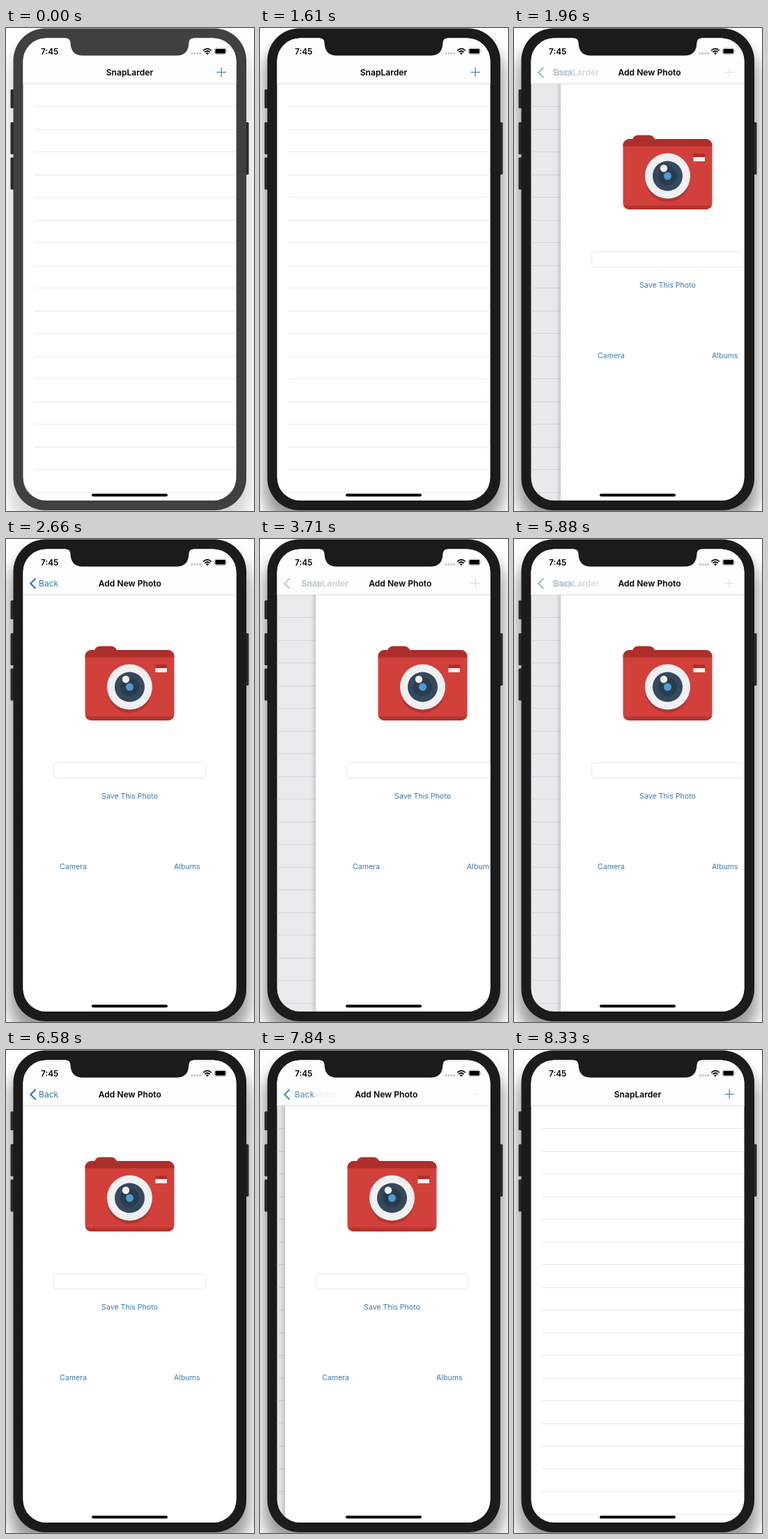
An HTML page for the animation above (9030 ms loop, 356x692 px).

```html
<!DOCTYPE html>
<html lang="en">
<head>
<meta charset="utf-8">
<title>Photo list</title>
<style>
  html, body { margin: 0; width: 100%; height: 100%; overflow: hidden; background: #fff; }
  svg { display: block; width: 356px; height: 692px; }
  text { font-family: Inter, Roboto, sans-serif; }
  .bar { font-size: 12.1px; }
  .bold { font-weight: 600; }
  .mid { text-anchor: middle; }
  .link { font-size: 10.6px; fill: #3878ae; }
  #shade { filter: blur(11px); }
</style>
</head>
<body>
<svg viewBox="0 0 356 692">
  <defs>
    <clipPath id="screen"><rect x="24.5" y="14.5" width="306" height="662.500" rx="33"/></clipPath>
    <clipPath id="cam"><rect x="113.500" y="159" width="128" height="101" rx="9"/></clipPath>
    <linearGradient id="edge"><stop offset="0" stop-opacity="0"/><stop offset="1" stop-opacity=".14"/></linearGradient>
  </defs>

  <rect id="shade" x="5" y="22" width="345" height="690" rx="46"/>
  <g fill="#292929">
    <rect x="6.5" y="88" width="8" height="27" rx="1.5"/>
    <rect x="6.5" y="135" width="8" height="46" rx="1.5"/>
    <rect x="6.5" y="185.5" width="8" height="46" rx="1.5"/>
    <rect x="340" y="135" width="8.5" height="75" rx="1.5"/>
  </g>
  <rect class="body" x="10.5" y=".5" width="334.5" height="690.5" rx="46"/>

  <g clip-path="url(#screen)">
    <rect x="24" y="14" width="307" height="664" fill="#fff"/>
    <g id="list" stroke="#e7e7e9"></g>
    <rect id="dim" x="24" y="80" width="307" height="600" fill="#06061a"/>
    <g id="page">
      <rect x="17" y="80" width="7" height="600" fill="url(#edge)"/>
      <rect x="24" y="80" width="308" height="600" fill="#fff"/>
      <path d="M126 164 Q127 153.500 135 153.500 H151 Q159 153.500 160.500 164 Z" fill="#ad2f2b"/>
      <g clip-path="url(#cam)">
        <rect x="113" y="159" width="129" height="101" fill="#d2403b"/>
        <rect x="113" y="159" width="129" height="10.500" fill="#ad2f2b"/>
        <rect x="113" y="254.500" width="129" height="6" fill="#b2342f"/>
      </g>
      <circle cx="177.500" cy="217" r="32" fill="#b2342f"/>
      <circle cx="177.500" cy="212" r="32.500" fill="#f0f0f2"/>
      <circle cx="177.500" cy="212" r="21.500" fill="#35495d"/>
      <circle cx="177.500" cy="212" r="13.500" fill="#2b3c4e"/>
      <circle cx="177.500" cy="212" r="5.500" fill="#4b9cd3"/>
      <circle cx="172" cy="201" r="5.200" fill="#f0f0f2"/>
      <rect x="214.500" y="180" width="16.500" height="5" fill="#ad2f2b"/>
      <rect x="214.500" y="185" width="16.500" height="6" fill="#f4f0f0"/>
      <rect x="68.500" y="320.500" width="218" height="22" rx="4" fill="#fff" stroke="#e6e6e7"/>
      <text class="link mid" x="177.500" y="372.200">Save This Photo</text>
      <text class="link mid" x="96.500" y="472.700">Camera</text>
      <text class="link mid" x="259.800" y="472.700">Albums</text>
    </g>

    <rect x="24" y="14" width="307" height="66" fill="#fdfdfd"/>
    <path d="M24 80H331" stroke="#d6d6d8"/>
    <path id="chevron" d="M42.500 56.500L35.200 63.800L42.500 71.100" fill="none" stroke="#3478b4" stroke-width="2.100"/>
    <text id="back" class="bar" x="47" y="68" fill="#3878ae">Back</text>
    <text id="listTitle" class="bar bold mid" x="177.500" y="68">SnapLarder</text>
    <text id="pageTitle" class="bar bold mid" x="177.800" y="68">Add New Photo</text>
    <path id="plus" d="M302.500 63.300H316M309.200 56.500V70" stroke="#4587cc" stroke-width="1.300"/>

    <text class="bold" x="50" y="38" font-size="11.800">7:45</text>
    <g fill="#bdbdbf">
      <circle cx="267" cy="36.500" r="1.400"/><circle cx="270.900" cy="36.500" r="1.400"/>
      <circle cx="274.800" cy="36.500" r="1.400"/><circle cx="278.700" cy="36.500" r="1.400"/>
    </g>
    <path d="M283.200 32.300Q289 26.900 294.800 32.300M285.300 34.700Q289 31.300 292.700 34.700" fill="none" stroke="#000" stroke-width="1.700"/>
    <path d="M286.900 36.100Q289 34.400 291.100 36.100L289 38.300Z"/>
    <rect x="299.500" y="29" width="16.500" height="8.500" rx="2.300" fill="none" stroke="#9b9b9b" stroke-width=".8"/>
    <rect x="300.500" y="30" width="14.500" height="6.500" rx="1.300"/>
    <path d="M317 31.700Q318.500 33.200 317 34.800Z" fill="#9b9b9b"/>
    <rect x="123" y="667.200" width="109" height="4" rx="2"/>
  </g>
  <path class="body" d="M86 13.500V14.500Q92 14.500 92.500 21Q93 39.500 110 39.500H245Q262 39.500 262.500 21Q263 14.500 269 14.500V13.500Z"/>
</svg>
<script>
const LOOP = 9030, TICK = 70, FOCUS = 1610;
const $ = id => document.getElementById(id);
const clamp = v => Math.max(0, Math.min(1, v));

$('list').innerHTML = Array.from({ length: 18 }, (_, i) => {
  const y = Math.round(112 + i * 32.53) + .5;
  return `<path d="M40 ${y}H331"/>`;
}).join('');

// Share of the list revealed: 1 = list, 0 = photo page.
function push(ms) {
  const x = ms * .011;
  const left = (1 + x) * Math.exp(-x);
  return left < .007 ? 0 : left;
}

const DRAG = [[0, 0], [280, .02], [420, .06], [490, .1], [560, .183],
              [630, .46], [700, .74], [770, .92], [840, 1]];
function pop(ms) {
  const i = DRAG.findIndex(k => k[0] > ms);
  if (i < 0) return 1;
  const [t0, a] = DRAG[i - 1], [t1, b] = DRAG[i];
  return a + (b - a) * (ms - t0) / (t1 - t0);
}

const MOVES = [[1645, push], [3150, pop], [5565, push], [7490, pop]];
function reveal(t) {
  const move = MOVES.filter(m => m[0] <= t).pop();
  return move ? move[1](t - move[0]) : 1;
}

function place(id, x, opacity) {
  $(id).setAttribute('transform', `translate(${x.toFixed(2)} 0)`);
  $(id).setAttribute('opacity', clamp(opacity).toFixed(3));
}

function draw(t) {
  const q = reveal(t), r = 1 - q, active = t >= FOCUS;
  place('list', Math.round(-92 * r), 1);
  place('page', Math.round(306 * q), q < 1 ? 1 : 0);
  place('dim', 0, .105 * r ** 1.3);
  place('listTitle', -106 * r ** 1.14, q * 1.07);
  place('pageTitle', 196 * q ** 1.25, r * 1.3);
  place('back', 70 * q, 1 - 4.4 * q);
  place('chevron', 0, Math.max(1 - 3.5 * q, .4 * Math.sqrt(r)));
  place('plus', 0, q * 1.3);
  place('shade', 0, active ? .4 : .17);
  document.querySelectorAll('.body').forEach(e => e.setAttribute('fill', active ? '#1b1b1b' : '#404040'));
}

const start = performance.now();
function tick() {
  const t = (performance.now() - start) % LOOP;
  draw(Math.floor(t / TICK) * TICK);
  requestAnimationFrame(tick);
}
tick();
</script>
</body>
</html>
```
